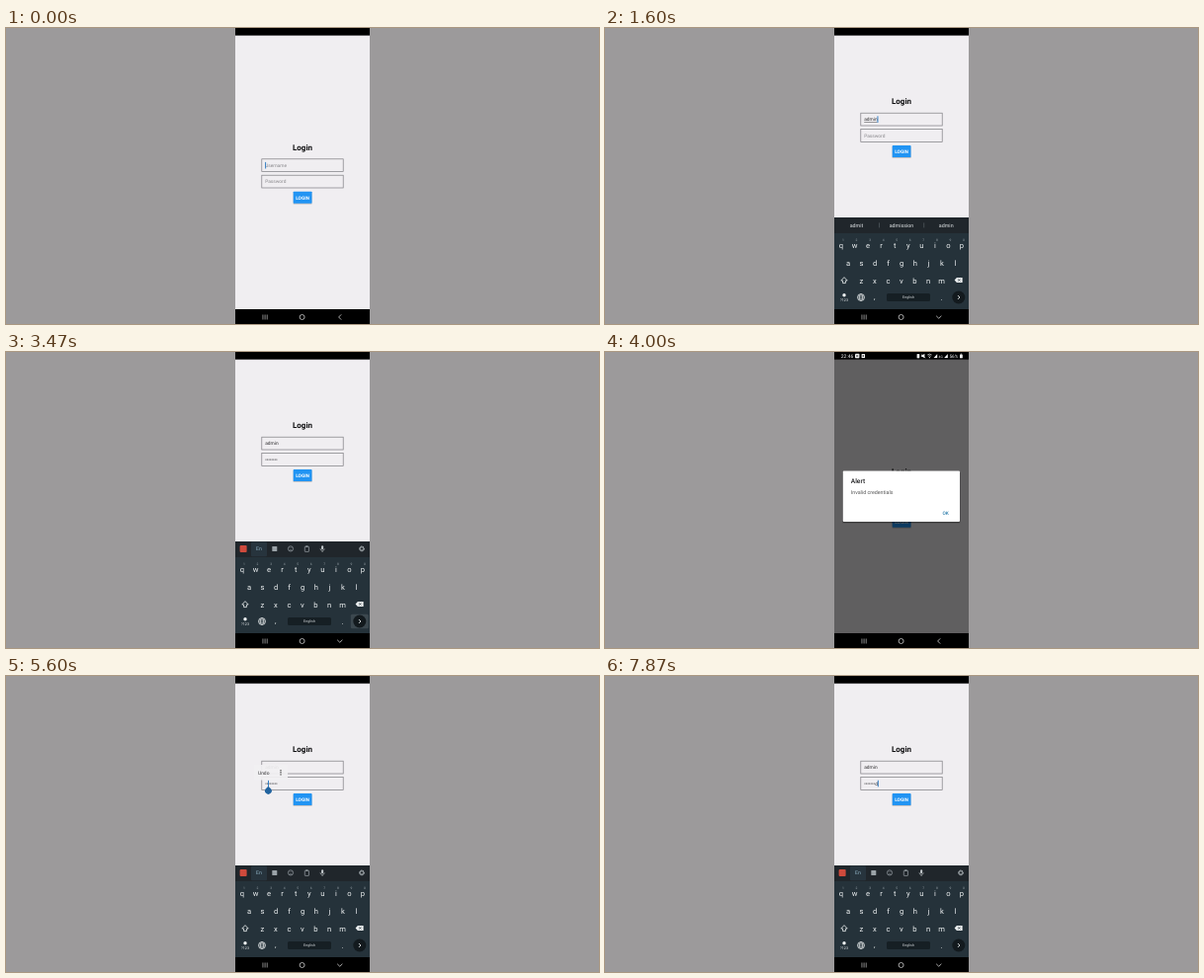
Recreate the animation shown at these times as an HTML page. Size 600x300 px, loop 8000 ms.

```html
<!DOCTYPE html>
<html lang="en">
<head>
<meta charset="utf-8">
<title>Login screen</title>
<style>
html, body { margin: 0; width: 100%; height: 100%; overflow: hidden; background: #9c9a9b; }
svg { display: block; width: 100vw; height: 100vh; font-family: Roboto, "Noto Sans", sans-serif; text-rendering: geometricPrecision; }
</style>
</head>
<body>
<svg id="stage" viewBox="0 0 600 300" preserveAspectRatio="none"></svg>
<script>
const LOOP = 8000, STEP = 1000 / 15, HOLD = 55;
const LIFT = 46.6, KEYS_TOP = 192, NAV_TOP = 285;
const PITCH = 13.55;
const stage = document.getElementById('stage');

// [key, press time]
const userTaps = [['a', 870], ['d', 1070], ['m', 1200], ['i', 1330], ['n', 1530]];
const firstTaps = [['p', 2000], ['a', 2270], ['s', 2470], ['s', 2600], ['w', 2730], ['o', 2870], ['r', 3000], ['d', 3130]];
const secondTaps = [['p', 6470], ['a', 6670], ['s', 7000], ['s', 7130], ['w', 7270], ['o', 7400], ['r', 7600], ['d', 7800]];
const allTaps = [...userTaps, ...firstTaps, ...secondTaps];
const hints = [[], ['a', 'and', 'as'], ['ad', 'add', 'and'], ['adm', 'admin', 'admit'],
  ['admit', 'admission', 'admin'], ['admit', 'admission', 'admin']];

const within = (t, a, b) => t >= a && t < b;
const ramp = (t, a, b) => Math.min(1, Math.max(0, (t - a) / (b - a)));
const easeOut = x => 1 - (1 - x) ** 3;
const typed = (taps, t) => taps.filter(k => t >= k[1] + HOLD).length;

const rect = (x, y, w, h, fill, r = 0, more = '') =>
  `<rect x="${x}" y="${y}" width="${w}" height="${h}" rx="${r}" fill="${fill}" ${more}/>`;
const circle = (x, y, r, fill, more = '') => `<circle cx="${x}" cy="${y}" r="${r}" fill="${fill}" ${more}/>`;
const line = (d, color, w = 0.8) =>
  `<path d="${d}" fill="none" stroke="${color}" stroke-width="${w}" stroke-linejoin="round"/>`;
const shape = (d, fill) => `<path d="${d}" fill="${fill}"/>`;
const text = (s, x, y, size, fill, anchor = 'start', weight = 400) =>
  `<text x="${x}" y="${y}" font-size="${size}" fill="${fill}" text-anchor="${anchor}" font-weight="${weight}">${s}</text>`;
const group = (body, dy = 0, opacity = 1) => `<g transform="translate(0 ${dy})" opacity="${opacity}">${body}</g>`;
const outline = (color, w = 0.7) => `stroke="${color}" stroke-width="${w}"`;

function keyPos(k) {
  const rows = ['qwertyuiop', 'asdfghjkl', 'zxcvbnm'];
  const row = rows.findIndex(r => r.includes(k));
  return { x: [239, 246, 259.3][row] + rows[row].indexOf(k) * PITCH, y: [221, 238.7, 256.7][row] };
}

function passwordState(t) {
  if (t < 5000) {
    const n = typed(firstTaps, t);
    return { n, last: n && t < 3330 ? firstTaps[n - 1][0] : '' };
  }
  const n = typed(secondTaps, t);
  if (n) return { n, last: secondTaps[n - 1][0] };
  return { n: 8 - Math.round(8 * ramp(t, 5870, 6400)), last: '' };
}

const caret = (x, y) => rect(x, y - 3.3, 0.9, 6.6, '#2274c0');

function form(t) {
  const dark = '#2a2a2c', hint = '#87868a';
  const frame = y => rect(258.8, y - 6.4, 82.4, 12.8, 'none', 0, outline('#7d7c80'));
  let s = text('Login', 300, 123.9, 8, '#0c0c0e', 'middle', 700) + frame(139.2) + frame(155.6);

  const un = typed(userTaps, t);
  const name = 'admin'.slice(0, un);
  const widths = [0, 2.6, 5.3, 9.5, 10.7, 13.3];
  s += un ? text(name, 262.2, 140.9, 4.8, dark) : text('Username', 262.2, 140.9, 4.8, hint);
  if (t < 1800) {
    if (un) s += rect(262.2, 141.9, widths[un], 0.45, dark);
    s += caret(262.2 + widths[un], 139.2);
  }

  const { n, last } = passwordState(t);
  const dots = last ? n - 1 : n;
  if (!n) s += text('Password', 262.2, 157.3, 4.8, hint);
  for (let i = 0; i < dots; i++) s += circle(263 + i * 1.55, 155.6, 0.62, '#444448');
  if (last) s += text(last, 262.3 + dots * 1.55, 157.3, 4.8, dark);

  const held = within(t, 4530, 5800);
  if (within(t, 1800, 3330) || t >= 4530) {
    const advance = { w: 3.6, r: 1.7, s: 2.5 }[last] || (last ? 2.7 : 0);
    s += caret(held ? 265 : 262.3 + dots * 1.55 + advance, 155.6);
  }

  s += rect(290.6, 166.4, 19, 12.3, '#000', 0.6, 'opacity=".18"')
    + rect(290.7, 165.7, 18.8, 12, '#2194f3', 0.6)
    + text('LOGIN', 300.1, 173.5, 4.8, '#fff', 'middle', 600);
  return s;
}

function selection(t) {
  let s = '';
  if (within(t, 4930, 5800)) {
    s += shape('M265.4 111.8 L268 114.2 A3.4 3.4 0 1 1 262.8 114.2 Z', '#21639f');
  }
  const show = Math.min(ramp(t, 5270, 5470), 1 - ramp(t, 5590, 5720));
  if (show > 0) {
    s += group(rect(251, 90, 34, 15.4, '#f2f1f3', 1)
      + text('Undo', 255, 99.6, 4.9, '#2b2b2d')
      + [95.7, 97.8, 99.9].map(y => circle(278, y, 0.7, '#222')).join(''), 0, show);
  }
  return s;
}

function toolbar() {
  const c = '#9ba3a8';
  return rect(236.6, 196, 7, 7, '#cf4a3c', 1)
    + rect(248, 192.6, 16, 14.6, '#27343d', 1)
    + text('En', 256, 201.2, 5.2, '#8fb2c4', 'middle')
    + rect(269.3, 197, 5, 5, c, 0.6)
    + circle(288, 199.4, 2.6, 'none', outline(c))
    + circle(287, 198.7, 0.4, c) + circle(289, 198.7, 0.4, c)
    + line('M286.6 200.2 Q288 201.8 289.4 200.2', c, 0.5)
    + rect(302.3, 197.2, 4.2, 5.2, 'none', 0.5, outline(c)) + rect(303.4, 196.4, 2, 1.4, c)
    + rect(319.1, 196.2, 2, 4, '#c3c9cc', 1)
    + line('M318 199.2 Q318 201.4 320.1 201.4 Q322.2 201.4 322.2 199.2 M320.1 201.4 V203', '#c3c9cc', 0.6)
    + circle(360, 199.4, 2.4, 'none', outline('#b9c0c4', 1) + ' stroke-dasharray="1.2 .68"')
    + circle(360, 199.4, 1.7, 'none', outline('#b9c0c4', 0.8));
}

function suggestions(n) {
  const xs = [254.5, 300, 345.2];
  return hints[n].map((w, i) => text(w, xs[i], 201.9, 5.3, '#e4e8ea', 'middle')).join('')
    + rect(277, 197.4, 0.5, 5, '#6b757b') + rect(322.6, 197.4, 0.5, 5, '#6b757b');
}

function keyboard(t) {
  const ink = '#eef1f2', lit = '#4b585f';
  let s = rect(232, KEYS_TOP, 136, 108, '#25323a') + rect(232, KEYS_TOP, 136, 16, '#20262b');
  const un = typed(userTaps, t);
  if (un && t < 1800) s += suggestions(un);
  else if (!within(t, 1800, 2000)) s += toolbar();

  for (const [k, at] of allTaps) {
    if (!within(t, at, at + HOLD)) continue;
    const p = keyPos(k);
    s += rect(p.x - 6, p.y - 7.5, 12, 14.6, lit, 1.5);
  }
  if (within(t, 5870, 6400)) s += rect(349, 249, 18, 14.4, lit, 1.5);
  if (within(t, 3470, 3530)) s += rect(348.8, 265.8, 18, 14.4, '#3c484f', 1.5);

  for (const k of 'qwertyuiopasdfghjklzxcvbnm') {
    const p = keyPos(k);
    s += text(k, p.x, p.y + 2.4, 7.6, ink, 'middle');
  }
  [...'1234567890'].forEach((d, i) => { s += text(d, 241 + i * PITCH, 216.2, 3.3, '#9aa5ab', 'middle'); });

  s += line('M242 252.6 L245.2 256 H243.4 V258.6 H240.6 V256 H238.8 Z', ink, 0.8)
    + shape('M353.6 255.5 L355.9 252.9 H361.6 V258.1 H355.9 Z', ink)
    + line('M357 254.2 L359.6 256.8 M359.6 254.2 L357 256.8', '#25323a', 0.7)
    + circle(242, 270.8, 1.7, ink) + text('?123', 242, 276.8, 3.7, ink, 'middle')
    + circle(259, 273, 3.5, 'none', outline(ink))
    + `<ellipse cx="259" cy="273" rx="1.6" ry="3.5" fill="none" ${outline(ink, 0.6)}/>`
    + line('M255.5 273 H262.5 M256.2 271.2 H261.8 M256.2 274.8 H261.8', ink, 0.5)
    + text(',', 272.8, 275.4, 7.6, ink, 'middle')
    + rect(285, 269, 44, 8, '#161f24', 1.5)
    + text('English', 307, 274.4, 3.7, '#d5dadd', 'middle')
    + text('.', 340.6, 275.6, 7.6, ink, 'middle')
    + circle(357.8, 273, 6.5, '#131a1e')
    + line('M357 271.1 L358.9 273 L357 274.9', ink, 0.9);
  return s;
}

function statusIcons() {
  const w = '#f2f2f2';
  const bars = x => shape(`M${x} 6 L${x + 3.6} 6 L${x + 3.6} 2 Z`, w);
  return text('22:46', 238.8, 5.8, 5, w)
    + rect(253, 1.8, 4.4, 4.4, w, 0.7) + line('M254.1 2.9 L256.3 5.1 M256.3 2.9 L254.1 5.1', '#222', 0.6)
    + rect(259.6, 1.9, 3.4, 4.2, w, 0.4) + rect(260.6, 3.2, 1.4, 1.6, '#444')
    + rect(315.6, 1.9, 2.6, 4.3, w, 0.5)
    + shape('M320.2 3 H321.5 L323.4 1.7 V6.3 L321.5 5 H320.2 Z', w) + line('M320.2 1.8 L324.2 6.2', w, 0.5)
    + line('M326.2 3 Q328.4 1.2 330.6 3 M327.1 4.3 Q328.4 3.2 329.7 4.3', w, 0.7) + circle(328.4, 5.6, 0.6, w)
    + bars(332.6) + text('4G', 337.6, 5.6, 3.4, w) + bars(343.2)
    + text('56%', 348.4, 5.8, 4.7, w)
    + rect(359, 2.4, 2.8, 3.8, w, 0.4) + rect(359.8, 1.7, 1.2, 0.8, w);
}

function alertBox() {
  return rect(239.8, 121, 119.9, 53, '#000', 2, 'opacity=".14"')
    + rect(240.4, 120.6, 118.8, 52.3, '#000', 1.5, 'opacity=".25"')
    + rect(240.7, 120.5, 118.3, 51.6, '#fff', 1)
    + text('Alert', 248.8, 133.4, 6.6, '#1d1d1f', 'start', 500)
    + text('Invalid credentials', 248.8, 143.7, 5.3, '#555', 'start')
    + text('OK', 344.7, 164.9, 4.8, '#2b7cab', 'middle', 500);
}

function navBar(open) {
  const c = '#bdbdbd';
  return rect(232, NAV_TOP, 136, 15, '#000')
    + [259.6, 261.7, 263.8].map(x => rect(x, 290.5, 0.7, 5, c)).join('')
    + circle(299.6, 293, 2.5, 'none', outline(c, 0.9))
    + line(open ? 'M335.2 291.8 L337.8 294.3 L340.4 291.8' : 'M339.2 290.4 L336.6 293 L339.2 295.6', c, 0.9);
}

function statusAlpha(t) {
  if (t < 4200) return ramp(t, 3730, 4000);
  if (t < 4530) return t < 4270 ? 1 : t < 4330 ? 0.6 : 0.2;
  return 0.2 * (1 - ramp(t, 4470, 4730));
}

function render(t) {
  const first = within(t, 470, 3530), again = t >= 4530;
  const open = first || again;
  const rise = open ? easeOut(ramp(t, first ? 400 : 4460, first ? 730 : 4730)) : 0;
  const lifted = within(t, 530, 3530) || t >= 4600;
  const alpha = t < 4200 ? ramp(t, 3730, 4000) : t < 4270 ? 1 : t < 4330 ? 0.4 : 0;

  let s = rect(0, 0, 600, 300, '#9c9a9b') + rect(232, 0, 136, 300, '#f0eef1');
  s += group(form(t), lifted ? -LIFT : 0);
  if (open) s += group(keyboard(t), (1 - rise) * (NAV_TOP - KEYS_TOP));
  s += selection(t);
  if (alpha) s += rect(232, 0, 136, 300, '#000', 0, `opacity="${alpha * 0.6}"`) + group(alertBox(), 0, alpha);
  s += rect(232, 0, 136, 7.6, '#000') + group(statusIcons(), 0, statusAlpha(t)) + navBar(open);
  stage.innerHTML = s;
}

const start = performance.now();
let shown = -1;
function tick() {
  const step = Math.floor(((performance.now() - start) % LOOP) / STEP);
  if (step !== shown) {
    shown = step;
    render(Math.round(step * STEP / 10) * 10);
  }
  requestAnimationFrame(tick);
}
tick();
</script>
</body>
</html>
```
